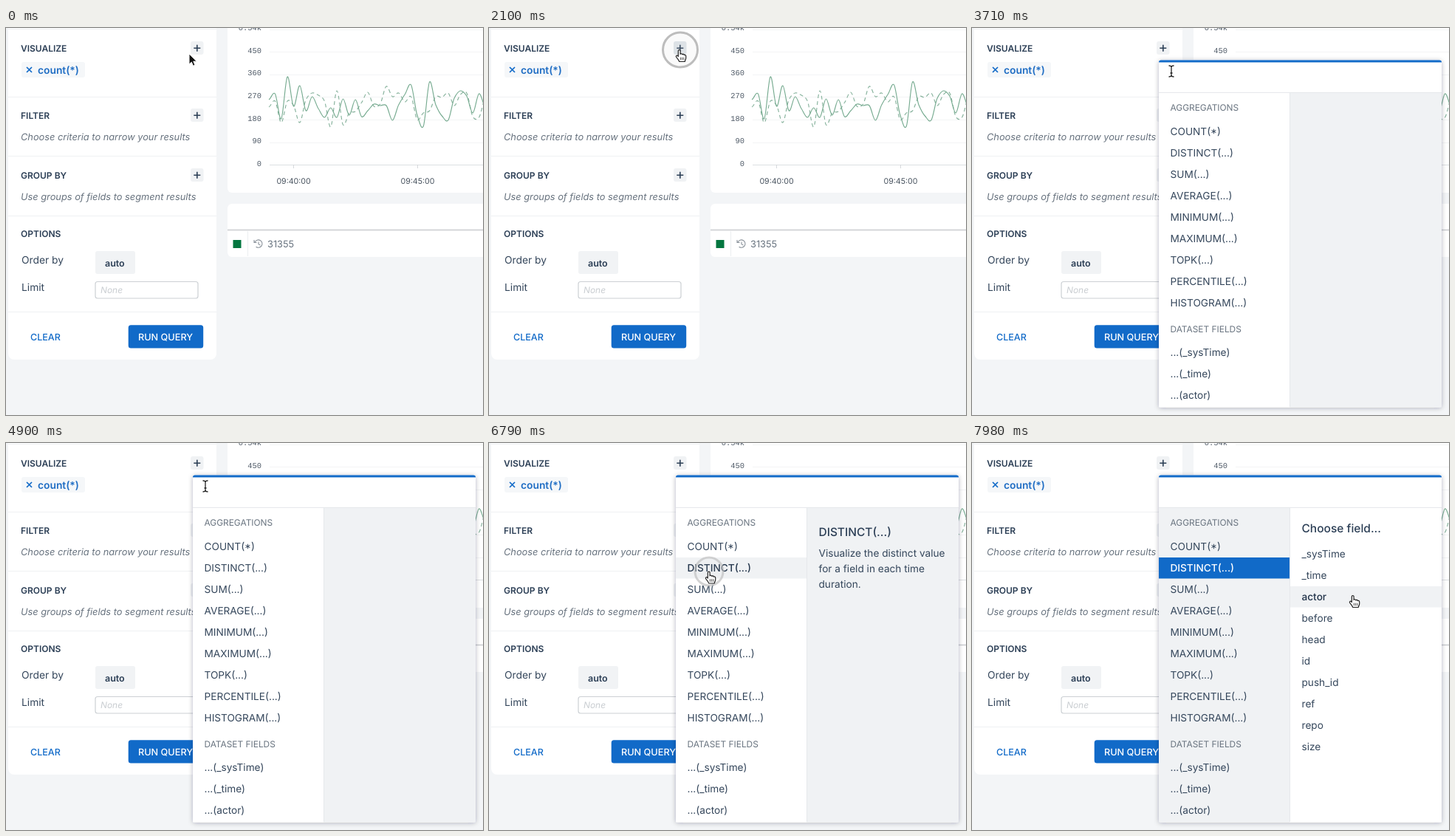
Write an HTML page that moves like this. It is 646 by 524 pixels and loops after 8 s.

```html
<!DOCTYPE html>
<html lang="en">
<head>
<meta charset="utf-8">
<title>Query builder</title>
<style>
html, body { margin: 0; width: 100%; height: 100%; overflow: hidden; background: #f3f5f7; }
svg {
  display: block; width: 646px; height: 524px;
  font-family: Inter, "Open Sans", sans-serif; text-rendering: geometricPrecision;
}
.mono { font-family: "Liberation Mono", "Noto Sans Mono", monospace; }
</style>
</head>
<body>
<svg id="stage" viewBox="0 0 646 524" xmlns="http://www.w3.org/2000/svg">
  <defs>
    <filter id="shadow" x="-10%" y="-10%" width="120%" height="120%">
      <feDropShadow dx="0" dy="1" stdDeviation="3" flood-color="#223" flood-opacity=".3"/>
    </filter>
  </defs>
  <g id="page"></g>
  <g id="popup"></g>
  <circle id="ring" fill="#ccc" fill-opacity=".1" stroke="#bdbdbd" stroke-width="3"/>
  <g id="cursor">
    <path id="arrow" d="M0 0V14.2L3.3 11.2L5.5 16.3L8 15.2L5.8 10.2H10.3Z" fill="#111" stroke="#fff" stroke-width="1"/>
    <g id="hand" fill="#fff" stroke="#222" stroke-width="1.2" stroke-linejoin="round" stroke-linecap="round">
      <path d="M-1.7 9V1.4C-1.7-.4 1-.4 1.1 1.4V6C1.3 4.9 3.6 4.9 3.8 6.5C4.3 5.5 6.2 5.8 6.3 7.2C7 6.4 8.7 6.9 8.7 8.5V11.3C8.7 13 7.4 13.8 7.3 16H-.4C-.8 13.8-3.1 12-4.5 9.5C-5.1 8.1-3.4 7.2-2.5 8.2Z"/>
      <path d="M1.4 10.6V13.4M3.6 10.6V13.4M5.8 10.6V13.4" stroke-width=".8"/>
    </g>
    <path id="beam" d="M-3.5-7Q0-7 0-5Q0-7 3.5-7M0-5V6M-3.5 8Q0 8 0 6Q0 8 3.5 8M-1.5 3H1.5" fill="none" stroke="#222" stroke-width="1.3"/>
  </g>
</svg>
<script>
const NS = "http://www.w3.org/2000/svg";
const $ = id => document.getElementById(id);
const page = $("page"), popup = $("popup");
const INK = "#34465b", HEAD = "#2b3e55", GRAY = "#68737f", BLUE = "#116ac8", PALE = "#f0f2f4";

function el(parent, tag, attrs) {
  const node = document.createElementNS(NS, tag);
  for (const key in attrs) node.setAttribute(key, attrs[key]);
  parent.appendChild(node);
  return node;
}
const rect = (parent, x, y, width, height, fill, more) =>
  el(parent, "rect", { x, y, width, height, fill, ...more });
const path = (parent, d, stroke, more) =>
  el(parent, "path", { d, stroke, fill: "none", ...more });

// y is the vertical middle of the capitals
function label(parent, x, y, text, size, fill, more) {
  const node = el(parent, "text", { x, y: y + size * 0.364, "font-size": size, fill, ...more });
  node.textContent = text;
  return node;
}
const show = (node, on) => node.setAttribute("visibility", on ? "inherit" : "hidden");

// Smooth curve through evenly spaced heights
function curve(ys) {
  const x0 = 356, dx = 8.37;
  const at = i => ys[Math.max(0, Math.min(ys.length - 1, i))];
  let d = `M${x0} ${ys[0]}`;
  for (let i = 0; i < ys.length - 1; i++) {
    const x = x0 + i * dx;
    d += `C${x + dx / 3} ${at(i) + (at(i + 1) - at(i - 1)) / 7} ` +
      `${x + dx * 2 / 3} ${at(i + 1) - (at(i + 2) - at(i)) / 7} ${x + dx} ${at(i + 1)}`;
  }
  return d;
}

function drawChart() {
  rect(page, 300, -10, 360, 233, "#fff", { rx: 6 });
  const ticks = ["0.54k", "450", "360", "270", "180", "90", "0"];
  ticks.forEach((text, i) => {
    const y = -0.5 + i * 30.6;
    label(page, 346, y, text, 10.4, "#4d5865", { class: "mono", "text-anchor": "end" });
    path(page, `M357 ${Math.round(y + 2) + .5}H646`, i == 6 ? "#dcdfe2" : "#f3f4f5");
  });
  [["09:40:00", 389.5], ["09:45:00", 557.5]].forEach(([text, x]) => {
    path(page, `M${x} 185V190`, "#d5d8db");
    label(page, x, 207.5, text, 10.6, "#48535f", { "text-anchor": "middle" });
  });
  const line = { "stroke-width": 1.15 };
  path(page, curve([107, 99, 128, 99, 105, 128, 97, 88, 91, 99, 134, 85, 131, 115, 113, 101, 87, 106,
    103, 79, 93, 88, 100, 93, 124, 115, 112, 93, 94, 88, 105, 90, 88, 120, 121, 95]),
    "#86b29c", { ...line, "stroke-dasharray": "5 4" });
  path(page, curve([97, 89, 123, 66, 106, 78, 112, 93, 109, 121, 108, 121, 96, 118, 97, 120, 112, 103,
    105, 105, 125, 104, 90, 77, 118, 133, 73, 104, 119, 125, 95, 85, 92, 115, 89, 107]),
    "#75aa8f", line);
}

function drawTable() {
  rect(page, 300, 238, 360, 72, "#fff", { rx: 6 });
  path(page, "M300 273.5H646", "#c9cccf", { "stroke-width": 1.4 });
  path(page, "M327.5 275V309", "#eceef0");
  rect(page, 307.5, 287, 11, 11, "#03763f");
  path(page, "M337 290A5.2 5.2 0 1 1 338.6 296.2M336 287V290.5H339.5M342 289.5V292.7L344.4 294",
    "#8b939b", { "stroke-width": 1.1 });
  label(page, 354, 292.5, "31355", 12.8, "#68737f");
}

let plusBox;
function drawPanel() {
  rect(page, 3, -10, 282, 459, "#fff", { rx: 8 });
  [1, 93, 173, 254, 384].forEach(y => path(page, `M3 ${y + .5}H285`, "#eff1f3"));
  const bold = { "font-weight": 600 };
  [["VISUALIZE", 27], ["FILTER", 118], ["GROUP BY", 199], ["OPTIONS", 278]].forEach(([text, y], i) => {
    label(page, 20, y + .2, text, 12, HEAD, bold);
    if (i == 3) return;
    const box = rect(page, 250, y - 9, 17.5, 18, PALE, { rx: 3 });
    plusBox = plusBox || box;
    path(page, `M254.3 ${y + .3}h9M258.8 ${y - 4.2}v9`, HEAD, { "stroke-width": 1.6 });
  });
  rect(page, 21, 46, 86, 21, "#f5f7f9", { rx: 3 });
  path(page, "M28 53L35 60M35 53L28 60", BLUE, { "stroke-width": 1.7 });
  label(page, 43, 56.5, "count(*)", 13.8, "#1f6dc4", bold);

  const italic = { "font-style": "italic" };
  label(page, 20, 147, "Choose criteria to narrow your results", 12.8, GRAY, italic);
  label(page, 20, 228, "Use groups of fields to segment results", 12.8, GRAY, italic);
  label(page, 21, 313.5, "Order by", 13.8, INK);
  label(page, 21, 350.5, "Limit", 13.8, INK);
  rect(page, 121, 302, 54, 31, "#f1f3f5", { rx: 3 });
  label(page, 134, 318, "auto", 12.5, HEAD, bold);
  rect(page, 121, 343.5, 139, 22.5, "#fff", { rx: 3, stroke: "#ccd0d4", "stroke-width": 1.2 });
  label(page, 128, 354.5, "None", 11.9, "#c9cdd1", italic);
  label(page, 33, 418, "CLEAR", 12.5, BLUE, { "font-weight": 500 });
  rect(page, 165.7, 402.2, 101.5, 31.2, BLUE, { rx: 3.5 });
  label(page, 179, 418, "RUN QUERY", 12.7, "#fff", { "font-weight": 500 });
}

const names = ["COUNT(*)", "DISTINCT(...)", "SUM(...)", "AVERAGE(...)", "MINIMUM(...)",
  "MAXIMUM(...)", "TOPK(...)", "PERCENTILE(...)", "HISTOGRAM(...)"];
const fields = ["_sysTime", "_time", "actor", "before", "head", "id", "push_id", "ref", "repo", "size"];
const ROW = 29, BODY = 13.65;
const parts = {};

function drawPopup() {
  rect(popup, 253, 43.5, 383, 470, "#fff", { rx: 3, filter: "url(#shadow)" });
  path(popup, "M253 46.4V46Q253 43.4 256 43.4H633Q636 43.4 636 46V46.4Z", "none", { fill: BLUE });
  parts.left = rect(popup, 253, 87, 177, 426.5, "#fff");
  parts.right = rect(popup, 430, 87, 206, 426.5, PALE);
  path(popup, "M253 87.5H636M430.5 87V513", "#e6e8eb");

  parts.rowBox = rect(popup, 253, 126, 177, 28.5, PALE);
  label(popup, 268.5, 108, "AGGREGATIONS", 11.9, GRAY);
  parts.rows = names.map((text, i) => label(popup, 268.5, 140.4 + i * ROW, text, BODY, INK));
  label(popup, 268.5, 407.2, "DATASET FIELDS", 11.9, GRAY);
  ["_sysTime", "_time", "actor"].forEach((text, i) =>
    label(popup, 268.5, 439.4 + i * ROW, `...(${text})`, BODY, INK));

  const help = parts.help = el(popup, "g", {});
  parts.title = label(help, 446.5, 120.5, "", 15.5, HEAD, { "font-weight": 500 });
  parts.lines = [0, 1, 2].map(i => label(help, 446.5, 149.3 + i * 21, "", BODY, INK));
  parts.lines[1].textContent = "for a field in each time";
  parts.lines[2].textContent = "duration.";

  const list = parts.list = el(popup, "g", {});
  parts.fieldBox = rect(list, 431, 194, 205, 28.5, PALE);
  label(list, 446.5, 115.7, "Choose field...", 15.5, HEAD, { "font-weight": 500 });
  parts.fields = fields.map((text, i) => label(list, 446.5, 150.4 + i * ROW, text, BODY, INK));
}

// Cursor stops: time, x, y
const stops = [[0, 248, 35], [1250, 248, 35], [1800, 258, 29.5], [2380, 258, 29.5], [2640, 269, 52],
  [2850, 270, 58], [5640, 270, 58], [5860, 282, 130], [6100, 283, 133], [6480, 298, 174],
  [7080, 298, 174], [7700, 516, 206.5], [8000, 516, 206.5]];
const OPEN = 2300, PICK = 6970;

function cursorAt(t) {
  let i = 0;
  while (i < stops.length - 2 && t >= stops[i + 1][0]) i++;
  const [a, ax, ay] = stops[i], [b, bx, by] = stops[i + 1];
  const u = (t - a) / (b - a), k = u * u * (3 - 2 * u);
  return [ax + (bx - ax) * k, ay + (by - ay) * k];
}

const rowAt = (y, top, count) => {
  const i = Math.floor((y - top) / ROW);
  return i >= 0 && i < count ? i : -1;
};
function mark(node, on, fill) {
  node.setAttribute("font-weight", on ? 500 : 400);
  node.setAttribute("fill", on ? fill : INK);
}

function ringAt(t, start, x, y, peak, size) {
  const u = (t - start) / 140, out = (t - start - 180) / 140;
  const k = Math.min(1, u), ring = $("ring");
  if (u < 0 || out > 1) return false;
  ring.setAttribute("cx", x);
  ring.setAttribute("cy", y);
  ring.setAttribute("r", size * (0.6 + 0.4 * k));
  ring.setAttribute("opacity", peak * k * (1 - Math.max(0, out)));
  return true;
}

function draw(t) {
  const [x, y] = cursorAt(t);
  const open = t >= OPEN, picked = t >= PICK;
  const overPlus = y < 37 && x > 250 && x < 268 && t < 2400;
  const row = open && x < 430 ? rowAt(y, 126, names.length) : -1;
  const field = picked && x > 430 ? rowAt(y, 136, fields.length) : -1;

  plusBox.setAttribute("fill", overPlus ? "#dfe4e9" : PALE);
  show(popup, open);

  const lit = picked ? 1 : row;
  show(parts.rowBox, lit >= 0);
  parts.rowBox.setAttribute("y", 126 + Math.max(0, lit) * ROW);
  parts.rowBox.setAttribute("fill", picked ? BLUE : PALE);
  parts.rows.forEach((node, i) => mark(node, i == lit, picked ? "#fff" : "#22344a"));
  parts.left.setAttribute("fill", picked ? PALE : "#fff");
  parts.right.setAttribute("fill", picked ? "#fff" : PALE);

  show(parts.help, !picked && row >= 0);
  if (row >= 0) {
    const word = names[row].split("(")[0].toLowerCase();
    parts.title.textContent = names[row];
    parts.lines[0].textContent = `Visualize the ${word} value`;
  }
  show(parts.list, picked);
  show(parts.fieldBox, field >= 0);
  parts.fieldBox.setAttribute("y", 136 + Math.max(0, field) * ROW);
  parts.fields.forEach((node, i) => mark(node, i == field, "#22344a"));

  show($("ring"), ringAt(t, 1960, 259, 29.5, 1, 23.5) || ringAt(t, 6650, 298, 174, .65, 19));

  const onHand = overPlus || row >= 0 || field >= 0;
  const onBeam = open && !onHand && y > 54 && y < 87;
  $("cursor").setAttribute("transform", `translate(${x} ${y})`);
  show($("hand"), onHand);
  show($("beam"), onBeam);
  show($("arrow"), !onHand && !onBeam);
}

drawChart();
drawTable();
drawPanel();
drawPopup();

const start = performance.now(), LOOP = 8000, STEP = 70;
function tick() {
  const t = (performance.now() - start) % LOOP;
  draw(Math.floor(t / STEP) * STEP);
  requestAnimationFrame(tick);
}
tick();
</script>
</body>
</html>
```
